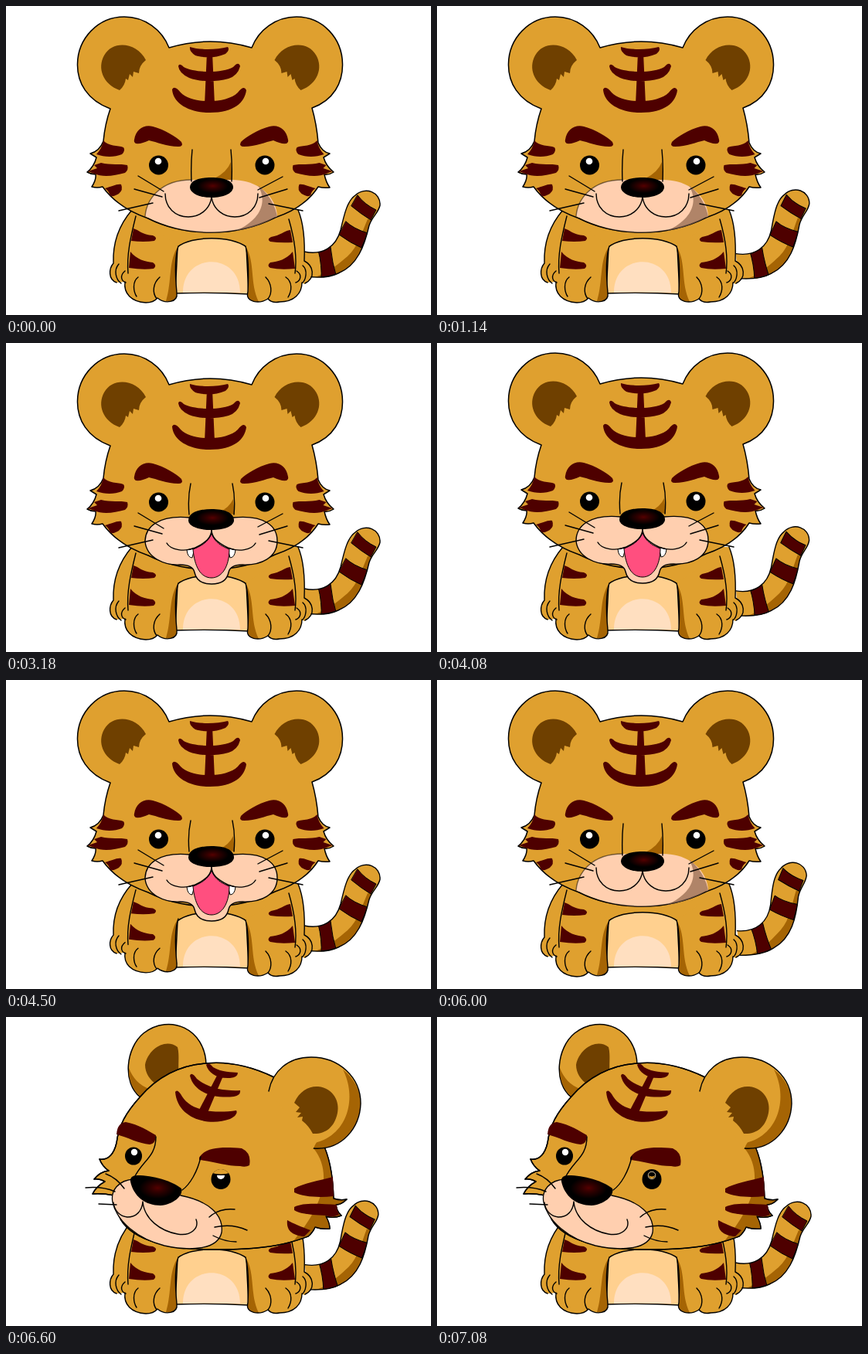
Animation, 550 px wide and 400 px high, one loop 8 s. Source, as an HTML page:

```html
<!DOCTYPE html>
<html lang="en">
<head>
<meta charset="utf-8">
<title>Tiger cub</title>
<style>
html, body { margin: 0; width: 100%; height: 100%; overflow: hidden; background: #fff; }
svg { display: block; width: 550px; height: 400px; }
path, polyline { stroke-linejoin: round; stroke-linecap: round; }
.o { fill: #dfa02f; stroke: #000; stroke-width: 1.5; }
.f { fill: #dfa02f; }
.l { fill: none; stroke: #000; stroke-width: 1.4; }
.s { fill: #4e0000; }
.e { fill: #6f4000; }
.d { fill: #a56404; }
.m { fill: #ffcfaf; }
.w { fill: #fff; }
</style>
</head>
<body>
<svg viewBox="0 0 550 400">
  <defs>
    <radialGradient id="shine" cx=".53" cy=".42" r=".42">
      <stop offset="0" stop-color="#540000"/><stop offset=".3" stop-color="#320000"/><stop offset=".85" stop-color="#000"/>
    </radialGradient>
    <path id="tailShape" d="M386 318C410 323 427 312 433 290C438 268 442 252 452 245C465 233 485 241 484 258C482 268 474 272 470 284C464 310 455 336 430 346C418 352 402 352 386 350"/>
    <clipPath id="tailClip"><use href="#tailShape"/></clipPath>
    <clipPath id="eyeClip"><ellipse cx="278" cy="210" rx="12.5" ry="13"/></clipPath>
    <path id="skull" d="M259 60C290 57 322 66 347 78L412 168C421 190 423 212 424 235Q433 238 441 236Q434 243 427 243Q428 252 434 257Q424 261 414 258Q419 267 419 274Q409 275 400 272Q397 279 391 284C372 291 345 302 262 301C205 300 158 287 146 257L140 231Q125 228 112 229Q117 219 128 213Q120 209 114 210Q122 200 133 199Q125 194 121 184C133 186 140 176 143 163C146 140 155 124 173 104C195 78 225 62 259 60Z"/>
    <path id="earA" d="M174 104C150 85 155 40 178 21C212 -5 258 15 259 62"/>
    <path id="earB" d="M340 96C345 70 365 52 395 52C431 52 459 78 459 112C458 142 436 173 398 170"/>
    <g id="shape"><use href="#earA"/><use href="#skull"/><use href="#earB"/>
      <path d="M104 219h40v3h-40zM120 241h24v2h-24z"/></g>
  </defs>

  <g id="ghost">
    <g fill="#ffffdc"><use href="#shape" class="g2"/><use href="#shape" class="g2"/></g>
    <g fill="#ffdfd4"><use href="#shape" class="g1"/><use href="#shape" class="g1"/></g>
  </g>

  <g id="tail">
    <use href="#tailShape" class="f"/>
    <g clip-path="url(#tailClip)">
      <path class="d" d="M396 352C418 346 432 332 442 324C456 311 460 294 468 276L490 280 480 365 396 365Z"/>
      <path class="s" stroke="#000" d="M404 316L420 312Q422 332 428 352L408 356Q409 335 404 316ZM440 279Q449 288 468 294L460 313Q446 307 431 296ZM455 245Q464 257 479 264L472 277Q459 269 447 259Z"/>
    </g>
    <use href="#tailShape" class="l"/>
  </g>

  <g id="body">
    <path class="f" d="M163 264C145 290 140 320 142 345L220 371H312L384 345C388 310 386 285 378 264Z"/>
    <path d="M222 312C240 297 292 297 311 312L314 373Q266 370 219 372Z" fill="#ffd08f" stroke="#000" stroke-width="1.5"/>
    <path d="M229 371C229 318 303 318 303 371Q266 370 229 371Z" fill="#ffdfc0"/>
    <g id="armL">
      <path class="f" d="M163 264C145 285 138 310 139 333C133 340 132 354 143 358L154 357C152 372 162 383 181 384Q191 384 196 378C206 386 223 384 221 371C219 350 218 325 223 311Z"/>
      <path class="d" d="M223 311C210 328 215 356 207 382Q221 383 221 371C219 350 218 325 223 311Z"/>
      <path class="l" d="M163 264C145 285 138 310 139 333C133 340 132 354 143 358M146 334C139 342 142 354 149 359M154 343C147 349 149 356 155 358M154 357C152 372 162 383 181 384Q191 384 196 378C206 386 223 384 221 371C219 350 218 325 223 311M168 272C161 300 156 322 158 346M171 351C163 357 165 370 169 376M199 351C190 359 189 371 195 379"/>
      <path class="s" d="M165 288C172 290 176 296 190 297Q197 300 192 304Q178 306 162 304ZM161 318C169 328 180 331 190 332Q196 336 191 340Q178 342 159 339Z"/>
    </g>
    <g id="armR">
      <path class="f" d="M378 264C386 283 387 305 386 330C398 336 400 352 386 360L383 358C383 372 373 383 354 383Q344 385 339 379C328 386 309 384 313 370C314 350 314 325 310 311Z"/>
      <path class="d" d="M310 311C323 332 315 358 327 383Q311 383 313 370C314 350 314 325 310 311Z"/>
      <path class="l" d="M378 264C386 283 387 305 386 330C398 336 401 352 387 359M384 336C391 342 388 355 383 359M376 343C384 348 381 356 375 358M383 358C383 372 373 383 354 383Q344 385 339 379C328 386 309 384 313 370C314 350 314 325 310 311M366 276C373 300 377 324 374 346M362 351C371 357 370 369 365 377M336 351C344 359 345 372 339 379"/>
      <path class="s" d="M368 290C360 291 355 297 343 299Q337 302 342 305Q355 307 371 306ZM371 318C363 328 352 331 342 332Q337 336 342 339Q355 342 374 340Z"/>
    </g>
  </g>

  <g id="front">
    <path class="o" d="M135 133C105 122 92 99 92.500 75C93 42 119 14 153 14C180 14 202 31 211 54Q264 38 318 54C327 31 349 14 376 14C410 14 435 42 435.500 75C436 99 424 122 396 132Q402 153 404 177Q409 189 419 191L411 196Q414 207 424 215Q418 219 412 218Q414 228 419 235Q411 236 404 234C392 253 372 266 348 274C320 288 290 293 265 293C240 293 210 288 184 275C158 266 138 252 125 234Q118 236 111 234Q117 225 116 218Q110 218 105 215Q114 208 117 196L109 191Q121 188 126 175Q128 153 135 133Z"/>
    <g id="halves"><g id="half">
      <path class="e" d="M181 70C170 48 139 43 127 64C118 80 125 101 147 109Q154 103 155 94L158 96 160 88 164 92 165 85 172 87Q172 77 181 70Z"/>
      <path class="s" d="M126 174C132 182 145 180 152 183Q155 187 150 192C140 196 128 196 117 192Q124 185 126 174ZM106 214L118 210 114 206 123 203C135 206 148 204 157 206Q159 212 154 216C140 220 125 222 114 217ZM128 236C137 234 143 230 149 231Q152 238 146 243Q138 248 134 245Q134 240 128 236Z"/>
    </g></g>
    <path class="s" d="M260 60H267L270 128H257ZM238 53C250 57 272 57 287 53Q290 57 284 62C270 68 255 67 245 64Q237 59 238 53ZM223 78Q224 73 230 79C245 87 280 87 294 79Q301 71 303 78Q300 90 288 94C270 99 250 98 237 93Q224 87 223 78ZM215 108Q218 102 226 112C240 127 285 127 300 112Q308 102 311 109C309 125 295 138 264 138C235 138 216 125 215 108Z"/>
    <g id="brows">
      <path id="brow" class="s" d="M166 173C168 160 178 153 190 156C205 160 220 169 227 176Q230 182 223 182C208 182 195 176 185 174Q175 179 168 178Q165 176 166 173Z"/>
      <use href="#brow" transform="translate(531 0) scale(-1 1)"/>
    </g>
    <g id="eyesOpen">
      <circle cx="197.500" cy="206" r="12.500"/><circle class="w" cx="197" cy="201" r="4.300"/>
      <circle cx="335" cy="206" r="12.500"/><circle class="w" cx="336" cy="201" r="4.300"/>
    </g>
    <path id="eyesShut" fill="none" stroke="#000" stroke-width="3" d="M179 191L209 204 180 216M354 191L324 204 353 216"/>
    <g id="shut">
      <path class="d" d="M291 202Q286 215 270 223L293 226Z"/>
      <path class="m" d="M180 272C182 250 200 225 240 225H292C330 225 350 250 351 272C320 288 290 293 265 293C240 293 210 288 180 272Z"/>
      <path d="M326 232C338 252 332 275 298 291Q328 286 351 272Q346 248 326 232Z" fill="#b08468"/>
      <path class="l" stroke-width="1" d="M180 272C182 250 200 225 240 225M184 275C210 288 240 293 265 293C290 293 320 288 348 274" opacity=".5"/>
      <path class="l" d="M241 186Q239 205 240 227M291 186Q293 205 292 227M266 247C264 264 250 273 236 273C219 273 206 261 206 243M266 247C268 264 282 273 296 273C313 273 326 261 326 243"/>
      <path fill="url(#shine)" d="M238 235C238 226 250 222 266 222C282 222 294 226 294 235C293 243 281 248 266 248C251 248 239 243 238 235Z"/>
    </g>
    <g id="open">
      <path class="d" d="M294 202Q289 213 276 219L296 222Z"/>
      <path class="m" stroke="#000" stroke-width="1.400" d="M238 226C196 222 180 239 180 257C182 278 205 288 225 287Q242 287 244 297C246 307 254 312 266 312C278 312 286 307 288 297Q290 287 306 287C330 288 351 278 351 256C351 238 336 222 294 226Z"/>
      <path class="w" stroke="#000" d="M234 268Q235 278 241 278L244 266ZM297 268Q296 278 290 278L287 266Z"/>
      <path d="M242 267C250 264 263 258 266 246C269 258 281 264 289 267C289 290 279 304 266 304C252 304 244 290 242 267Z" fill="#ff4f7f" stroke="#000"/>
      <path class="l" d="M239 182Q235 200 237 222M293 182Q297 200 295 222M208 259C213 268 231 271 245 265C259 258 266 252 266 241C266 252 273 258 287 265C301 271 318 268 323 259"/>
      <path fill="url(#shine)" d="M236 230C236 219 250 215 266 215C282 215 295 219 295 230C294 238 281 242 266 242C250 242 237 238 236 230Z"/>
    </g>
    <path class="l" d="M171 220L204 240M166 237L202 247M146 265L190 255M358 221L326 238M364 237L328 248M384 265L340 256"/>
  </g>

  <g id="turned">
    <use href="#earA" class="o"/>
    <path class="d" d="M159 66C158 84 166 96 174 103L187 94C172 88 164 79 159 66Z"/>
    <path class="e" d="M180 62C184 41 207 27 222 39C225 50 222 64 224 72C212 74 200 79 195 87C186 82 180 72 180 62Z"/>
    <use href="#skull" class="o"/>
    <path class="d" d="M398 170C410 185 413 202 410 220C406 240 395 262 372 290L391 284 400 272Q409 275 419 274Q419 267 414 258Q424 261 434 257Q428 252 427 243Q434 243 441 236Q433 238 424 235C423 212 421 190 412 168Z"/>
    <use href="#skull" class="l"/>
    <use href="#earB" class="f"/>
    <path class="d" d="M436 68C454 103 444 152 400 163L398 170C436 173 458 142 459 112Q458 86 436 68Z"/>
    <use href="#earB" class="l"/>
    <path class="f" d="M342 94L397 171 402 162 385 130Z"/>
    <path class="e" d="M373 111C380 95 393 89 404 90C424 92 432 110 429 124C425 144 412 152 397 151Q392 141 383 134L384 129 377 130 382 124 375 123 380 117Z"/>
    <path class="s" d="M275 72L282 74 260 126 249 122ZM259 62Q262 58 268 65C280 72 292 71 300 72Q300 78 290 79C272 80 262 72 259 62ZM238 76Q240 70 247 80C262 93 285 96 303 95Q304 101 295 103C270 106 243 98 238 76ZM219 97Q222 92 228 103C240 122 270 125 298 121Q301 126 290 132C262 142 222 132 219 97ZM373 222C385 215 405 212 423 207L424 232C405 234 385 233 373 227ZM373 246C385 240 405 242 428 243Q428 250 431 256Q422 260 414 257C395 256 380 255 373 250ZM364 263C371 267 383 272 394 276L386 284C376 283 362 280 364 263Z"/>
    <path class="s" d="M143 152Q144 137 155 136C172 139 185 148 194 153Q194 164 186 165C172 164 158 156 143 152ZM250 182C258 168 280 168 305 170Q318 176 315 192Q310 195 303 193C285 193 270 187 250 185Z"/>
    <ellipse cx="165" cy="180" rx="11" ry="11.500"/><circle class="w" cx="166" cy="175" r="4.200"/>
    <ellipse cx="278" cy="210" rx="12.500" ry="13"/><circle class="w" cx="278" cy="205" r="5"/>
    <g id="residue">
      <circle cx="278" cy="205" r="4.800" stroke="#dfc79a" stroke-width=".8"/>
      <path class="f" d="M274 205Q278 208 282 205Q281 209 278 209Q275 209 274 205Z"/>
    </g>
    <g id="lid" clip-path="url(#eyeClip)"><path id="lidCover" class="o" d="M262 170H294V196Q278 202 262 196Z" stroke-width="2"/></g>
    <path class="m" stroke="#000" stroke-width="1.300" d="M166 210C145 211 135 225 138 240C144 265 170 287 205 296C237 303 274 302 279 279C282 256 262 238 226 231Z"/>
    <path class="l" d="M194 155C194 182 176 186 166 208M252 181C248 200 238 217 228 224M177 239C176 252 168 259 157 259C147 258 140 250 139 240M177 239C179 262 200 277 222 281C240 284 250 273 246 262M263 259Q276 247 296 249M270 272Q293 267 312 276M268 283Q283 291 298 291M103 221Q125 219 141 226M129 203Q143 208 153 222M120 242L143 243"/>
    <path fill="url(#shine)" d="M161 213Q160 205 170 205C190 205 215 212 227 222C230 232 215 243 200 244C180 244 165 232 161 213Z"/>
  </g>
</svg>
<script>
const $ = id => document.getElementById(id);
const LOOP = 8000, STEP = 60;

const twin = $('half').cloneNode(true);
twin.removeAttribute('id');
twin.setAttribute('transform', 'translate(528.500 0) scale(-1 1)');
$('halves').append(twin);

const within = (t, spans) => spans.some(([a, b]) => t >= a && t < b);
// Rises from 0 to 1 and falls back over each span.
const swing = (t, spans) => spans.reduce((v, [a, b]) =>
  Math.max(v, 1 - Math.abs(2 * (t - a) / (b - a) - 1)), 0);
const show = (id, on) => $(id).setAttribute('display', on ? 'inline' : 'none');
const move = (el, value) => el.setAttribute('transform', value);

const BLINK = [[600, 720], [840, 1020]];
const WAG = [[1020, 1620], [3960, 4500], [5700, 6300], [6480, 7080]];
const BROWS = [[2100, 2340]];
const MOUTH = [[2820, 3540], [4020, 5280]];
const PAW_L = [[4380, 4620], [6720, 7020]];
const PAW_R = [[2760, 3180], [4080, 4380], [6300, 6540]];
const BOB = [[3960, 4440]];
const WINK = [[6540, 7080]];
const TURN = 6180;
const GHOST = { 6180: 50, 6240: 41, 6300: 18 };

function squash(id, k) {
  move($(id), `translate(0 265) scale(1 ${1 - .043 * k}) translate(0 -265)`);
}

function draw(time) {
  const t = Math.floor(time / STEP) * STEP;
  const turned = t >= TURN, shut = within(t, BLINK), open = within(t, MOUTH);
  const wag = swing(t, WAG), wink = swing(t, WINK), blur = GHOST[t] || 0;

  show('front', !turned);
  show('turned', turned);
  show('eyesOpen', !shut);
  show('eyesShut', shut);
  show('open', open);
  show('shut', !open);
  move($('front'), `translate(0 ${-2 * swing(t, BOB)})`);
  move($('brows'), `translate(0 ${-12 * swing(t, BROWS)})`);
  move($('tail'), `translate(${4 * wag} ${6.3 * wag}) rotate(${-7.2 * wag} 388 330)`);
  squash('armL', swing(t, PAW_L));
  squash('armR', swing(t, PAW_R));

  show('lid', wink > 0);
  show('residue', t >= 7080);
  move($('lidCover'), `translate(0 ${24 * wink})`);

  show('ghost', blur > 0);
  for (const [name, k] of [['.g2', 1], ['.g1', .55]])
    document.querySelectorAll(name).forEach((el, i) =>
      move(el, `translate(${(i ? 1 : -1) * blur * k} 4)`));
}

const start = performance.now();
function tick() {
  draw((performance.now() - start) % LOOP);
  requestAnimationFrame(tick);
}
tick();
</script>
</body>
</html>
```
